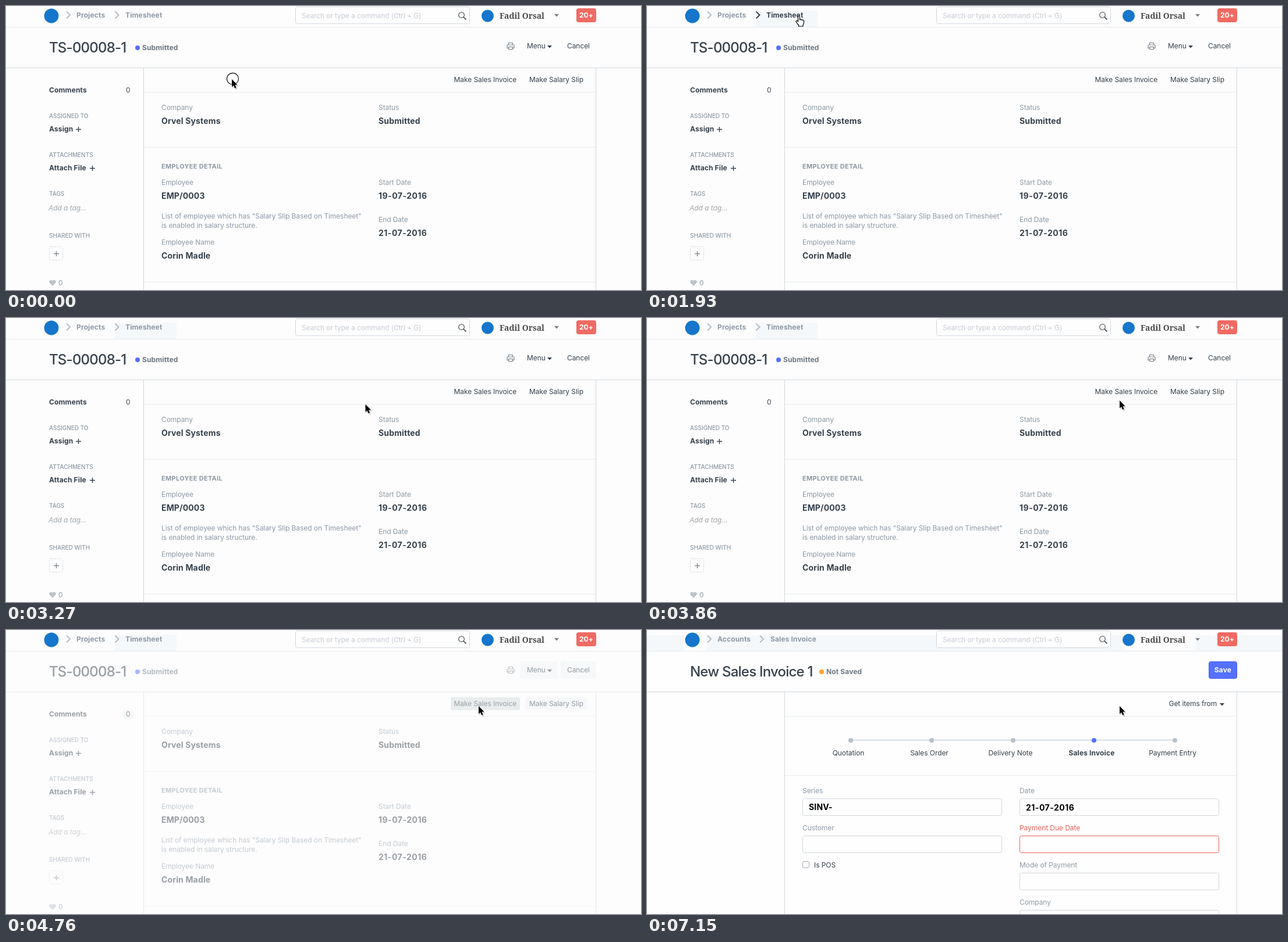
Write an HTML page that moves like this. It is 1091 by 489 pixels and loops after 8000 ms.

```html
<!DOCTYPE html>
<html lang="en">
<head>
<meta charset="utf-8">
<title>Timesheet to invoice</title>
<style>
html, body { margin: 0; width: 100%; height: 100%; overflow: hidden; background: #fdfdfd; }
svg { display: block; width: 1091px; height: 489px; font: 12px Inter, "Open Sans", sans-serif; letter-spacing: -.07px; fill: #36414c; }
text { white-space: pre; }
.mid { text-anchor: middle; }
.b, .crumb, .state { font-weight: 700; letter-spacing: .13px; }
.val { font-size: 14px; font-weight: 700; letter-spacing: .15px; }
.date { letter-spacing: .5px; }
.lbl { fill: #8d99a6; }
.cap { font-size: 10px; font-weight: 500; letter-spacing: 0; fill: #8d99a6; }
.sec { font-size: 11px; font-weight: 700; letter-spacing: .3px; fill: #8d99a6; }
.title { font-size: 24px; font-weight: 500; letter-spacing: -.78px; }
.state { fill: #6c7680; }
.crumb { fill: #8d99a6; }
.name { font: 600 14px "Noto Serif", serif; fill: #4a4a4a; }
.line { fill: none; stroke: #d1d8dd; }
.thin { fill: none; stroke: #e8ebee; }
.plus { fill: none; stroke: #36414c; stroke-width: 1.4; }
.chev { fill: none; stroke: #b4bcc4; stroke-width: 2; }
.box { fill: #fefefe; stroke: #d1d8dd; }
.soft { fill: #f6f8f9; }
.tint { fill: #f5f8fb; }

/* every animation holds its value until the next key */
.a { animation: 8s step-end infinite; }
#cursor { animation-name: move; }
#arrow { animation-name: arrow; }
#hand { animation-name: hand; }
#ring { animation-name: ring; }
#sheet { animation-name: sheet; }
#form { animation-name: form; }
.old { animation-name: old; }
.new { animation-name: new; }
#lit { animation-name: lit; }
#hover { animation-name: hover; }
#focus { animation-name: focus; }
#trail { animation-name: trail; }
#softOld { animation-name: softOld; }
#softNew { animation-name: softNew; }
#due { animation-name: due; }

@keyframes move {
  0% { transform: translate(388px, 126px); }
  16.75% { transform: translate(386px, 123px); }
  18.625% { transform: translate(351px, 90px); }
  20.375% { transform: translate(322px, 64px); }
  22.25% { transform: translate(300px, 36px); }
  24.125% { transform: translate(261px, 17px); }
  26% { transform: translate(260px, 17px); }
  29.75% { transform: translate(262px, 26px); }
  31.625% { transform: translate(268px, 48px); }
  33.5% { transform: translate(270px, 60px); }
  37.25% { transform: translate(297px, 100px); }
  39.125% { transform: translate(460px, 138px); }
  40.875% { transform: translate(617.5px, 148.5px); }
  42.75% { transform: translate(740px, 160px); }
  44.625% { transform: translate(806px, 163px); }
  46.5% { transform: translate(812px, 152px); }
  48.25% { transform: translate(812px, 142px); }
  50.125% { transform: translate(812px, 134px); }
  52%, 100% { transform: translate(812px, 131px); }
}
@keyframes arrow { 0% { opacity: 1; } 24.125% { opacity: 0; } 31.625%, 100% { opacity: 1; } }
@keyframes hand { 0% { opacity: 0; } 24.125% { opacity: 1; } 31.625%, 100% { opacity: 0; } }
@keyframes ring { 0% { opacity: 1; } 1.875% { opacity: 0; } 55.75% { opacity: 1; } 57.625%, 100% { opacity: 0; } }
@keyframes sheet { 0% { opacity: 1; } 57.625% { opacity: .75; } 59.5% { opacity: .5; } 85.75%, 100% { opacity: 0; } }
@keyframes form { 0% { opacity: 0; } 85.75% { opacity: .5; } 87.5% { opacity: .75; } 89.375%, 100% { opacity: 1; } }
@keyframes old { 0% { opacity: 1; } 85.75%, 100% { opacity: 0; } }
@keyframes new { 0% { opacity: 0; } 85.75%, 100% { opacity: 1; } }
@keyframes lit { 0% { fill: #8d99a6; stroke: #b4bcc4; } 24.125% { fill: #36414c; stroke: #36414c; } 31.625%, 100% { fill: #8d99a6; stroke: #b4bcc4; } }
@keyframes hover { 0% { opacity: 0; } 50.125% { opacity: .5; } 52%, 100% { opacity: 1; } }
@keyframes focus { 0% { opacity: 0; } 55.75% { opacity: 1; } 57.625%, 100% { opacity: 0; } }
@keyframes trail { 0% { opacity: 0; } 24.125% { opacity: 1; } 85.75%, 100% { opacity: 0; } }
@keyframes softOld { 0% { opacity: 0; } 59.5% { opacity: 1; } 85.75%, 100% { opacity: 0; } }
@keyframes softNew { 0% { opacity: 0; } 85.75% { opacity: 1; } 89.375%, 100% { opacity: 0; } }
@keyframes due { 0% { stroke: #d1d8dd; } 89.375%, 100% { stroke: #ee6055; } }
</style>
</head>
<body>
<svg viewBox="0 0 1091 489">
  <defs>
    <path id="caret" d="M-4-2H4L0 2.5Z"/>
    <path id="plus" class="plus" d="M-4.5 0H4.5M0-4.5V4.5"/>
    <path id="chevron" d="M-3-6L3 0L-3 6"/>
  </defs>

  <!-- top bar -->
  <rect id="trail" class="tint a" x="187" y="8" width="106" height="28"/>
  <g class="new a">
    <rect class="tint" y="9" width="1091" height="27"/>
    <path fill="#fdfdfd" d="M64 9H102V36H64ZM818 9H943V35H818Z"/>
  </g>
  <path class="thin" d="M0 36.5H1091"/>
  <circle cx="78" cy="17" r="12.5" fill="#1676cb"/>
  <use href="#chevron" class="chev" x="107" y="15.5"/>
  <g class="crumb old a">
    <text x="121" y="20">Projects</text>
    <g id="lit" class="a">
      <use href="#chevron" fill="none" stroke-width="2" x="190.5" y="15.5"/>
      <text x="205" y="20" stroke="none">Timesheet</text>
    </g>
  </g>
  <g class="crumb new a">
    <text x="121" y="20">Accounts</text>
    <use href="#chevron" class="chev" x="197" y="15.5"/>
    <text x="212" y="20">Sales Invoice</text>
  </g>
  <rect class="box" x="497.5" y="1.5" width="299" height="29" rx="3"/>
  <text x="508" y="21" fill="#c6ccd2" letter-spacing="-.12">Search or type a command (Ctrl + G)</text>
  <g fill="none" stroke="#555d65" stroke-width="1.3">
    <circle cx="782.5" cy="15.5" r="4.8"/>
    <path d="M786 19L790.5 23.5" stroke-width="1.8"/>
  </g>
  <circle cx="827.5" cy="17" r="10.5" fill="#1676cb"/>
  <text class="name" x="848" y="22">Fadil Orsal</text>
  <use href="#caret" x="946" y="16" fill="#777f87"/>
  <rect x="980" y="4" width="34" height="24" rx="4" fill="#ef6a62"/>
  <text class="b mid" x="997" y="20" fill="#fff">20+</text>

  <!-- button backs that show while dimmed -->
  <g id="softOld" class="soft a">
    <rect x="883" y="54" width="65" height="30" rx="3"/>
    <rect x="953" y="54" width="61" height="30" rx="3"/>
    <rect x="892" y="116" width="106" height="22" rx="3"/>
    <circle cx="209.5" cy="145" r="9.5"/>
  </g>
  <rect id="softNew" class="soft a" x="891" y="116" width="106" height="22" rx="3"/>

  <!-- timesheet page -->
  <g id="sheet" class="a">
    <path class="line" d="M0 106.5H1091M236.5 107V489M1013.5 107V489"/>
    <path class="thin" d="M237 148.5H1013M237 243.5H1013M237 475.5H1013"/>
    <text class="title" x="74" y="80">TS-00008-1</text>
    <circle cx="226" cy="72" r="4" fill="#5470ff"/>
    <text class="state" x="234" y="76">Submitted</text>
    <g fill="none" stroke="#7c858e" stroke-width="1.2">
      <path d="M863.5 67V63.5H870.5V67M863 72.5H861V68.5Q861 67 862.5 67H871.5Q873 67 873 68.5V72.5H871"/>
      <rect x="863.5" y="70.5" width="7" height="4"/>
    </g>
    <text x="895" y="73">Menu</text>
    <use href="#caret" x="934" y="70"/>
    <text x="964" y="73">Cancel</text>

    <g id="focus" class="a" fill="none" stroke="#66afe9">
      <rect x="762.5" y="114.5" width="122" height="25" rx="4" stroke-width="3" opacity=".45"/>
      <rect x="764" y="116" width="119" height="22" rx="3" stroke-width="2"/>
    </g>
    <rect id="hover" class="a" x="764" y="116" width="119" height="22" rx="2" fill="#d5dcdf"/>
    <text x="769.5" y="131">Make Sales Invoice</text>
    <text x="899" y="131">Make Salary Slip</text>

    <text class="b" x="74" y="149">Comments</text>
    <text x="206" y="149">0</text>
    <text class="cap" x="74" y="193">ASSIGNED TO</text>
    <text class="b" x="74" y="216">Assign</text>
    <use href="#plus" x="124.5" y="212.5"/>
    <text class="cap" x="74" y="260">ATTACHMENTS</text>
    <text class="b" x="74" y="283">Attach File</text>
    <use href="#plus" x="148.5" y="279.5"/>
    <text class="cap" x="74" y="327">TAGS</text>
    <text x="73" y="352" fill="#a0a6ac" font-style="italic">Add a tag...</text>
    <text class="cap" x="74" y="399">SHARED WITH</text>
    <rect class="line" x="74.5" y="414.5" width="23" height="23" rx="3" stroke-dasharray="3 2"/>
    <use href="#plus" x="86.5" y="426.5" opacity=".6"/>
    <path fill="#bcc3ca" d="M80 482L75 477C72.5 474 76 469.5 80 473C84 469.5 87.5 474 85 477Z"/>
    <text class="lbl" x="90" y="481">0</text>

    <text class="lbl" x="267" y="179">Company</text>
    <text class="val" x="267" y="203">Orvel Systems</text>
    <text class="lbl" x="640" y="179">Status</text>
    <text class="val" x="640" y="203">Submitted</text>
    <text class="sec" x="267" y="280">EMPLOYEE DETAIL</text>
    <text class="lbl" x="267" y="308">Employee</text>
    <text class="val" x="267" y="332">EMP/0003</text>
    <text class="lbl" x="267" y="366">List of employee which has "Salary Slip Based on Timesheet"</text>
    <text class="lbl" x="267" y="382">is enabled in salary structure.</text>
    <text class="lbl" x="267" y="411">Employee Name</text>
    <text class="val" x="267" y="435">Corin Madle</text>
    <text class="lbl" x="640" y="308">Start Date</text>
    <text class="val date" x="640" y="332">19-07-2016</text>
    <text class="lbl" x="640" y="372">End Date</text>
    <text class="val date" x="640" y="396">21-07-2016</text>
  </g>

  <!-- invoice page -->
  <g id="form" class="a">
    <rect y="37" width="1091" height="452" fill="#fefefe"/>
    <path class="line" d="M0 106.5H1091M236.5 107V489M1013.5 107V489"/>
    <path class="thin" d="M237 148.5H1013M237 250.5H1013"/>
    <text class="title" x="74" y="80">New Sales Invoice 1</text>
    <circle cx="300" cy="72" r="4" fill="#ffa32e"/>
    <text class="state" x="308" y="76">Not Saved</text>
    <rect x="965.5" y="54.5" width="48" height="29" rx="3" fill="#5470ff" stroke="#4461f2"/>
    <text class="b mid" x="989.5" y="73" fill="#fff">Save</text>
    <text x="896.5" y="131">Get items from</text>
    <use href="#caret" x="988" y="128"/>

    <path d="M350 189.5H907" stroke="#b8c2cc"/>
    <g fill="#b8c0cc">
      <circle cx="350" cy="190" r="4"/><circle cx="489" cy="190" r="4"/>
      <circle cx="629" cy="190" r="4"/><circle cx="907" cy="190" r="4"/>
      <circle cx="768" cy="190" r="4" fill="#5470ff"/>
    </g>
    <g class="mid">
      <text x="346" y="216">Quotation</text>
      <text x="485" y="216">Sales Order</text>
      <text x="624.5" y="216">Delivery Note</text>
      <text class="b" x="764" y="216">Sales Invoice</text>
      <text x="903" y="216">Payment Entry</text>
    </g>

    <g class="box">
      <rect x="267.5" y="290.5" width="342" height="29" rx="3"/>
      <rect x="267.5" y="354.5" width="342" height="29" rx="3"/>
      <rect x="640.5" y="290.5" width="342" height="29" rx="3"/>
      <rect id="due" class="a" x="640.5" y="354.5" width="342" height="29" rx="3"/>
      <rect x="640.5" y="418.5" width="342" height="29" rx="3"/>
      <rect x="640.5" y="482.5" width="342" height="29" rx="3"/>
      <rect x="267.5" y="398.5" width="11" height="11" rx="2.5" stroke="#a4a9ae"/>
    </g>
    <text class="lbl" x="267" y="281">Series</text>
    <text class="val" x="278" y="310" fill="#000">SINV-</text>
    <text class="lbl" x="267" y="345">Customer</text>
    <text x="287" y="409">Is POS</text>
    <text class="lbl" x="640" y="281">Date</text>
    <text class="val date" x="651" y="311" fill="#000">21-07-2016</text>
    <text x="640" y="345" fill="#ee6055">Payment Due Date</text>
    <text class="lbl" x="640" y="409">Mode of Payment</text>
    <text class="lbl" x="640" y="473">Company</text>
  </g>

  <!-- pointer -->
  <g id="cursor" class="a">
    <circle id="ring" class="a" cx="1.5" cy="-.7" r="10" fill="none" stroke="#111" stroke-width="1.2"/>
    <g id="arrow" class="a">
      <path d="M1 2V16L4.3 13L6.5 18H9.5L7.5 12.5H12Z" fill="#000" opacity=".18"/>
      <path d="M0 0V13.5L3 10.7L5.2 15.7L7.6 14.7L5.5 9.8H9.6Z" fill="#000" stroke="#fff" paint-order="stroke"/>
    </g>
    <path id="hand" class="a" fill="#fff" stroke="#000" stroke-width="1.2" stroke-linejoin="round"
      d="M-1.5 10V2Q-1.5 .5 0 .5T1.500 2V7Q3 5 4 7Q5.500 6 6.500 7.500Q8.500 7 8.500 9V12Q8.500 14 7 15.500V18H-.5V16Q-2 14.500-3.500 12Q-6 9.500-4.500 8.500Q-3 8-1.500 10Z"/>
  </g>
</svg>
</body>
</html>
```
